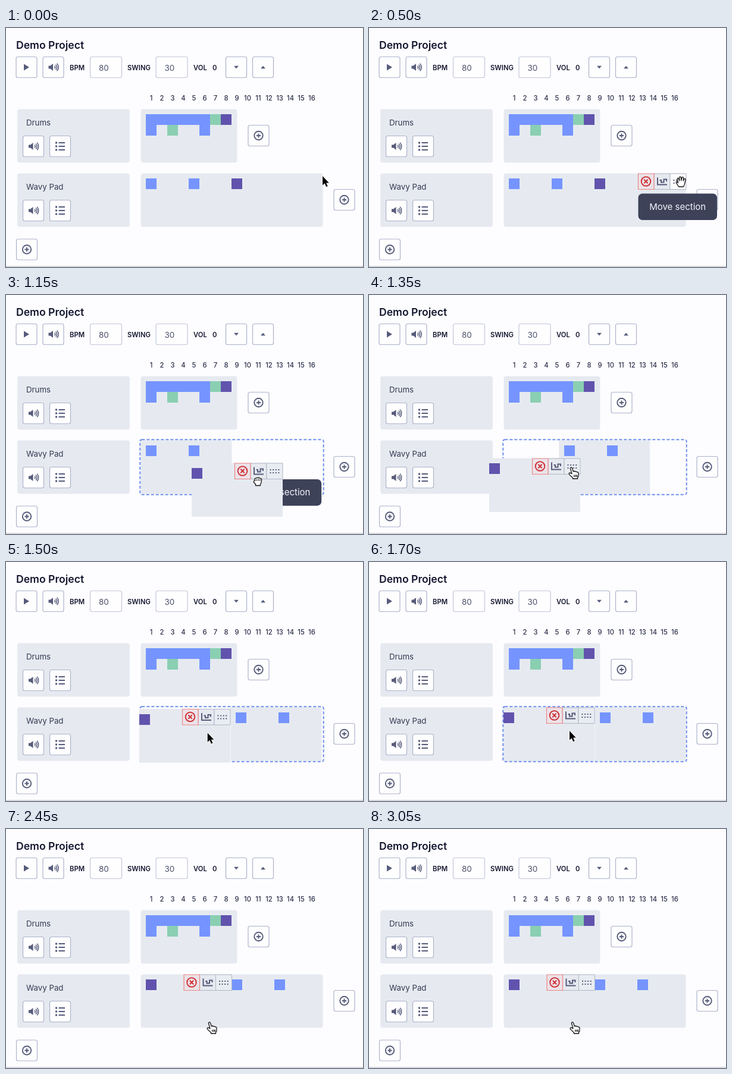
Recreate the animation shown at these times as an HTML page with a canvas. Size 600 px wide and 402 px high, loop 3.1 s.

```html
<!DOCTYPE html>
<html lang="en">
<head>
<meta charset="utf-8">
<title>Demo Project</title>
<style>
html, body { margin: 0; width: 100%; height: 100%; overflow: hidden; background: #fdfdff; }
canvas { display: block; }
</style>
</head>
<body>
<canvas id="stage" width="600" height="402"></canvas>
<script>
const ctx = document.getElementById('stage').getContext('2d');
const LOOP = 3100, STEP = 50;
const BG = '#fdfdff', PANEL = '#e6eaf0', LINE = '#adb2cb', ICON = '#565b7a', INK = '#14162f';
const BLUE = '#7594ff', GREEN = '#8acfb2', PURPLE = '#6153ad', RED = '#d0353c', DASH = '#7090ee';
const CELL = 18, ROW_H = 90, HALF = 153;
const PICK = 1000, DROP = 1750;

// [time, x, y]
const blockPath = [[1000, 380, 244.5], [1050, 371, 251], [1100, 345, 266], [1150, 312, 282.5], [1200, 279, 295],
  [1250, 232, 293], [1300, 198, 284], [1350, 202, 274.5], [1400, 211, 261], [1450, 219, 252], [1500, 224, 247], [1550, 226, 244.5]];
const mousePath = [[0, 532, 249], [100, 530, 252], [250, 526, 256], [400, 524, 258], [950, 524, 258], [1000, 515, 264],
  [1050, 489, 279], [1100, 456, 295], [1150, 423, 313], [1200, 379, 308], [1250, 342, 298], [1300, 342, 297],
  [1301, 340, 290], [1350, 340, 290], [1700, 337, 284], [1850, 339, 298], [2000, 341, 316], [2150, 342, 325]];

const shapes = {
  arrow: new Path2D('M0 0V15.5L3.6 12.2L6.3 18.2L8.7 17.1L6.1 11.4H10.8Z'),
  open: new Path2D('M-3.5 9L-7.5 2.5Q-8.5 0-6.3.5L-4.5 2.5L-6-4Q-5.5-6.5-3.7-5L-2.3-1L-2.5-6.5Q-1.3-9 .3-6.8L.8-1.5L1.8-6.5Q3.5-8.5 4.5-6.3L4.3-1L5.8-4.3Q7.8-5.5 8-3L6.8 3Q6.3 6 4.5 9Z'),
  fist: new Path2D('M-3.5 7.5V5.5L-6.5 2Q-7.3-.5-4.5-.8L-5-3Q-4.5-5.5-2.3-4.8Q-.8-6.8.8-5.2Q2.5-6.5 3.8-4.6Q6.5-5 6.6-2L6 2.5L4.5 5.5V7.5ZM-2-3V-.5M1-3.5V-.5M3.8-3V-.5'),
  point: new Path2D('M-1.7 1.3Q-.2-1.5 1.4 1L3.4 7Q5.2 5.4 6.5 7.2Q8.4 6.1 9.4 8Q11.4 7.4 12 9.6V14Q11.6 16 10.5 17V19H2.5V17.5L-3.6 11.6Q-4.6 8.8-2 9.1L1 10.6ZM4.8 12.5V16M7.3 12.5V16M9.4 12.5V16'),
  speaker: new Path2D('M-8-2.5H-5L-.5-6V6L-5 2.5H-8Z'),
  waves: new Path2D('M2.2-2.3Q4.2 0 2.2 2.3M4.2-4.4Q7.8 0 4.2 4.4M6.2-6.4Q11.2 0 6.2 6.4'),
  axes: new Path2D('M-7.5-6.5V5.5H8.5M-4-2H-1.5V1.5H3V-3.5H7.5V0')
};

function along(keys, t) {
  const last = keys[keys.length - 1];
  if (t <= keys[0][0]) return keys[0].slice(1);
  if (t >= last[0]) return last.slice(1);
  const i = keys.findIndex(k => k[0] > t);
  const [a, b] = [keys[i - 1], keys[i]];
  const p = (t - a[0]) / (b[0] - a[0]);
  return [a[1] + (b[1] - a[1]) * p, a[2] + (b[2] - a[2]) * p];
}

function rect(x, y, w, h, color) {
  ctx.fillStyle = color;
  ctx.fillRect(x, y, w, h);
}

function box(x, y, w, h, r, fill, stroke, width = 1.2) {
  ctx.beginPath();
  ctx.roundRect(x, y, w, h, r);
  if (fill) { ctx.fillStyle = fill; ctx.fill(); }
  if (stroke) { ctx.strokeStyle = stroke; ctx.lineWidth = width; ctx.stroke(); }
}

function text(s, x, y, size, weight, color, align = 'left') {
  ctx.font = `${weight} ${size}px Inter, sans-serif`;
  ctx.textAlign = align;
  ctx.fillStyle = color;
  ctx.fillText(s, x, y);
}

function at(x, y, draw) {
  ctx.save();
  ctx.translate(x, y);
  draw();
  ctx.restore();
}

function stroke(path, color, width) {
  ctx.strokeStyle = color;
  ctx.lineWidth = width;
  path ? ctx.stroke(path) : ctx.stroke();
}

function speaker() {
  ctx.fillStyle = ICON;
  ctx.fill(shapes.speaker);
  stroke(shapes.waves, ICON, 1.5);
}

function list() {
  for (const y of [-6, 0, 6]) {
    rect(-8, y - 1.5, 3, 3, ICON);
    rect(-2.5, y - 1, 10.5, 2, ICON);
  }
}

function plus() {
  ctx.beginPath();
  ctx.arc(0, 0, 7.2, 0, 7);
  ctx.moveTo(-3.6, 0); ctx.lineTo(3.6, 0);
  ctx.moveTo(0, -3.6); ctx.lineTo(0, 3.6);
  stroke(null, ICON, 1.9);
}

function triangle(angle, w, h) {
  return () => {
    ctx.rotate(angle);
    ctx.beginPath();
    ctx.moveTo(-h / 2, -w / 2);
    ctx.lineTo(h / 2, 0);
    ctx.lineTo(-h / 2, w / 2);
    ctx.fillStyle = ICON;
    ctx.fill();
  };
}

function button(x, y, icon) {
  box(x - 17.5, y - 17.5, 35, 35, 3, '#fefeff', LINE);
  at(x, y, icon);
}

function field(x, value) {
  box(x, 48.5, 53, 35, 3, '#fefeff', '#c3c8da');
  text(value, x + 14.5, 71.5, 13.5, 400, '#4b5069');
}

function track(y, name) {
  box(19, y, 189, ROW_H, 4, PANEL);
  text(name, 34, y + 27.5, 13.3, 400, '#343953');
  button(46, y + 62.5, speaker);
  button(91, y + 62.5, list);
}

function scene() {
  rect(0, 0, 600, 402, BG);
  rect(0, 400.5, 600, 1, '#b9b9bf');
  text('Demo Project', 17, 35, 17.6, 600, INK);
  button(34.5, 66, triangle(0, 11, 9));
  button(79.5, 66, speaker);
  text('BPM', 107, 70.5, 11.25, 600, INK);
  field(141.5, '80');
  text('SWING', 204, 70.5, 11.25, 600, INK);
  field(252, '30');
  text('VOL', 315, 70.5, 11.25, 600, INK);
  text('0', 347, 70.5, 11.25, 600, INK);
  button(387, 66, triangle(Math.PI / 2, 8, 4.5));
  button(432, 66, triangle(-Math.PI / 2, 8, 4.5));
  for (let i = 0; i < 16; i++) text(i + 1, 244 + CELL * i, 122.3, 11.25, 500, '#2b2f49', 'center');

  track(136.5, 'Drums');
  box(226.5, 136.5, 162, ROW_H, 4, PANEL);
  rect(235, 145, CELL * 6, CELL, BLUE);
  rect(235, 163, CELL, CELL, BLUE);
  rect(325, 163, CELL, CELL, BLUE);
  rect(271, 163, CELL, CELL, GREEN);
  rect(343, 145, CELL, CELL, GREEN);
  rect(361, 145, CELL, CELL, PURPLE);
  button(424.5, 181, plus);

  track(244.5, 'Wavy Pad');
  button(568.5, 289, plus);
  button(35, 372.5, plus);
}

function cell(x, y, color) {
  rect(Math.round(x), Math.round(y), CELL, CELL, color);
}

function toolbar(x, y, hot) {
  const edge = '#b0b5c6';
  box(x + 27, y + .5, 27, 26.5, 0, '#e6eaf0', edge, 1);
  box(x + 54, y + .5, 27, 26.5, 0, hot ? '#fdfdff' : '#e9edf3', edge, 1);
  box(x + .5, y + .5, 26.5, 26.5, 0, '#ebe3e8', '#ee8587', 1.2);
  at(x + 13.5, y + 13.5, () => {
    ctx.beginPath();
    ctx.arc(0, 0, 7.8, 0, 7);
    for (const s of [-1, 1]) {
      ctx.moveTo(-3.2, -3.2 * s);
      ctx.lineTo(3.2, 3.2 * s);
    }
    stroke(null, RED, 2);
  });
  at(x + 40.5, y + 13.5, () => stroke(shapes.axes, ICON, 2));
  for (let i = 0; i < 8; i++) rect(x + 59.5 + (i % 4) * 4.6, y + 10.5 + (i >> 2) * 5, 2, 2, ICON);
}

function tooltip(x, y) {
  box(x, y, 132.5, 44.5, 7, '#3d4259');
  text('Move section', x + 66.2, y + 27.3, 15, 400, '#f4f5fb', 'center');
}

function pad(t) {
  if (t < PICK || t >= DROP) {
    const moved = t >= DROP;
    box(226.5, 244.5, 306, ROW_H, 4, PANEL);
    cell(moved ? 379 : 235, 253, BLUE);
    cell(moved ? 451 : 307, 253, BLUE);
    cell(moved ? 235 : 379, 253, PURPLE);
    if (t >= 100) toolbar(moved ? 298.5 : 452, 244.5, !moved);
    if (t >= 200 && !moved) tooltip(452.5, 278.5);
    return;
  }
  const p = Math.min(1, Math.max(0, (t - 1270) / 300));
  const shift = HALF * (1 - (1 - p) ** 3);
  rect(226.5 + shift, 244.5, HALF, ROW_H, PANEL);
  cell(235 + shift, 253, BLUE);
  cell(307 + shift, 253, BLUE);

  const [x, y] = along(blockPath, t);
  const settled = t >= 1550;
  const outline = () => {
    ctx.setLineDash([5, 3]);
    box(225.3, 243.3, 308.4, 92.4, 3, null, DASH, 2);
    ctx.setLineDash([]);
  };
  if (!settled) outline();
  if (t < 1300) {
    const [tx, ty] = along(blockPath, t - 20);
    tooltip(tx + 72.5, ty + 34);
  }
  rect(x, y, HALF, ROW_H + .5, PANEL);
  if (settled) outline();
  cell(x, y + 8.7, PURPLE);
  toolbar(x + 72, y, false);
}

function cursorKind(t) {
  if (t < 100) return 'arrow';
  if (t < 950) return 'open';
  if (t < 1300) return 'fist';
  return t >= 1500 && t < DROP ? 'arrow' : 'point';
}

function cursor(t) {
  const kind = cursorKind(t), path = shapes[kind], dark = kind === 'arrow';
  const [x, y] = along(mousePath, t);
  at(x, y, () => {
    ctx.lineJoin = 'round';
    if (dark) stroke(path, '#fff', 2);
    ctx.fillStyle = dark ? '#000' : '#fff';
    ctx.fill(path);
    if (!dark) stroke(path, '#111', 1.3);
  });
}

function frame(now) {
  const t = Math.floor((now % LOOP) / STEP) * STEP;
  scene();
  pad(t);
  cursor(t);
  requestAnimationFrame(frame);
}
requestAnimationFrame(frame);
</script>
</body>
</html>
```
